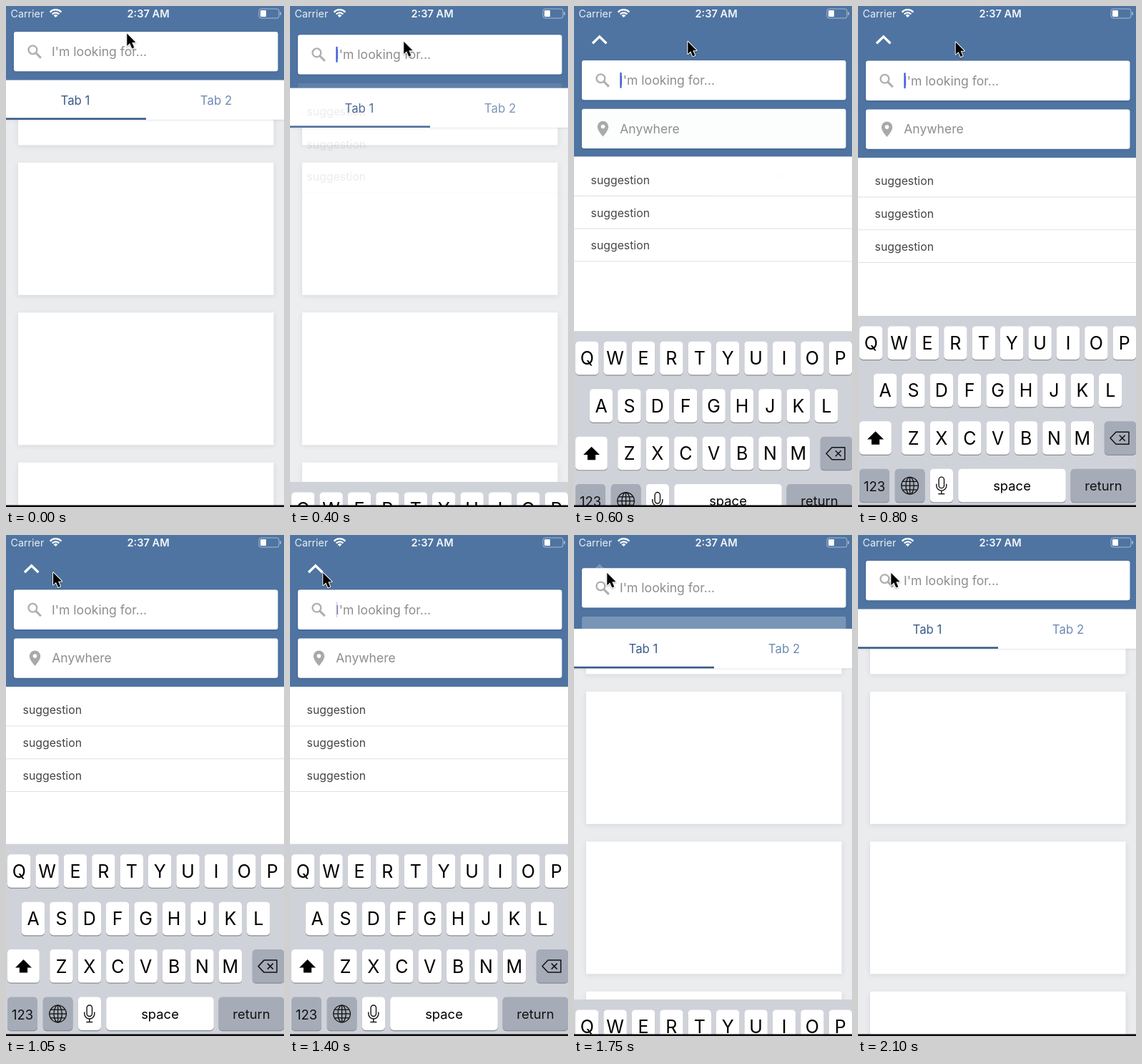
Animation of 389x700 px, one loop 2150 ms. Source, as an HTML page with a canvas:

```html
<!DOCTYPE html>
<html lang="en">
<head>
<meta charset="utf-8">
<title>Expanding search</title>
<style>
html, body { margin: 0; width: 100%; height: 100%; overflow: hidden; background: #ebecee; }
canvas { display: block; width: 389px; height: 700px; }
</style>
</head>
<body>
<canvas id="stage"></canvas>
<script>
const W = 389, H = 700, LOOP = 2150;
const FONT = 'Inter, Roboto, sans-serif';
const BLUE = '#4f74a1';
const canvas = document.getElementById('stage');
const ctx = canvas.getContext('2d');
const dpr = window.devicePixelRatio || 1;
canvas.width = W * dpr;
canvas.height = H * dpr;

const clamp = x => Math.max(0, Math.min(1, x));
const mix = (a, b, k) => a + (b - a) * k;
const ease = x => (1 - Math.cos(Math.PI * clamp(x))) / 2;
const smooth = x => { x = clamp(x); return x * x * (3 - 2 * x); };
// Critically damped spring, ms since its start
const spring = ms => {
  const k = 0.0174 * Math.max(0, ms);
  return 1 - (1 + k) * Math.exp(-k);
};

function rect(x, y, w, h, color) {
  ctx.fillStyle = color;
  ctx.fillRect(x, y, w, h);
}

function box(x, y, w, h, r, color) {
  ctx.fillStyle = color;
  ctx.beginPath();
  ctx.roundRect(x, y, w, h, r);
  ctx.fill();
}

function shadow(color, blur, dy) {
  ctx.shadowColor = color;
  ctx.shadowBlur = blur * dpr;
  ctx.shadowOffsetY = dy * dpr;
}

function poly(points, close) {
  ctx.beginPath();
  points.forEach(([x, y]) => ctx.lineTo(x, y));
  if (close) ctx.closePath();
}

function stroke(color, width) {
  ctx.strokeStyle = color;
  ctx.lineWidth = width;
  ctx.stroke();
}

function text(str, x, y, size, color, align = 'left', weight = 400) {
  ctx.font = `${weight} ${size}px ${FONT}`;
  ctx.fillStyle = color;
  ctx.textAlign = align;
  ctx.textBaseline = 'alphabetic';
  ctx.fillText(str, x, y + size * 0.364);
}

function layer(alpha, draw) {
  if (alpha <= 0) return;
  ctx.save();
  ctx.globalAlpha = alpha;
  draw();
  ctx.restore();
}

function cards() {
  rect(0, 0, W, H, '#ebecee');
  for (let i = 0; i < 4; i++) {
    ctx.save();
    shadow('rgba(60,70,90,0.13)', 7, 2);
    rect(17, 9.3 + i * 209.5, 357.5, 185, '#fff');
    ctx.restore();
  }
}

function statusBar() {
  text('Carrier', 6.5, 10.5, 14.3, '#e9eef5');
  text('2:37 AM', 199, 10.5, 14.6, '#f4f7fa', 'center', 600);
  ctx.lineCap = 'butt';
  for (const r of [6.6, 10.8]) {
    ctx.beginPath();
    ctx.arc(69.5, 16, r, -Math.PI * 0.76, -Math.PI * 0.24);
    stroke('#fff', 2.3);
  }
  ctx.beginPath();
  ctx.moveTo(69.5, 16);
  ctx.arc(69.5, 16, 4, -Math.PI * 0.76, -Math.PI * 0.24);
  ctx.fillStyle = '#fff';
  ctx.fill();
  ctx.beginPath();
  ctx.roundRect(354, 4, 28, 13, 3);
  stroke('rgba(255,255,255,0.5)', 1);
  box(356, 6, 8, 9, 1, '#fff');
  box(383.3, 8.3, 1.7, 4.5, 1, 'rgba(255,255,255,0.5)');
}

function field(y) {
  ctx.save();
  shadow('rgba(20,40,70,0.2)', 3, 1);
  box(11, y, 369.5, 55.3, 3, '#fff');
  ctx.restore();
}

function searchField(y, caret) {
  field(y);
  const cy = y + 27.7;
  ctx.lineCap = 'butt';
  ctx.beginPath();
  ctx.arc(37.4, cy - 2.5, 5.9, 0, Math.PI * 2);
  stroke('#aeaeae', 2.3);
  poly([[41.5, cy + 1.6], [48.8, cy + 8.9]]);
  stroke('#aeaeae', 3);
  text("I'm looking for...", 64, cy, 17.6, '#8d8d8d');
  layer(caret, () => box(64.3, cy - 11, 2.4, 22, 1, '#3f63e0'));
}

function placeField(y) {
  field(y);
  const cy = y + 27.7;
  ctx.fillStyle = '#a9a9a9';
  ctx.beginPath();
  ctx.arc(40.5, cy - 3, 7.7, Math.PI, 0);
  ctx.bezierCurveTo(48.2, cy + 2, 43.5, cy + 7.5, 40.5, cy + 11);
  ctx.bezierCurveTo(37.5, cy + 7.5, 32.8, cy + 2, 32.8, cy - 3);
  ctx.fill();
  ctx.beginPath();
  ctx.arc(40.5, cy - 3, 2.8, 0, Math.PI * 2);
  ctx.fillStyle = '#fff';
  ctx.fill();
  text('Anywhere', 64.3, cy, 17.5, '#8d8d8d');
}

function header(p, bottom, caret) {
  const top = mix(36, 76.6, p);
  rect(0, 0, W, bottom, BLUE);
  statusBar();
  layer(p, () => {
    ctx.lineCap = 'butt';
    ctx.lineJoin = 'miter';
    poly([[26, 52.3], [35.7, 42.9], [45.4, 52.3]]);
    stroke('#fff', 3.4);
  });
  ctx.save();
  ctx.beginPath();
  ctx.rect(0, 0, W, bottom);
  ctx.clip();
  layer(p, () => placeField(top + 67.8));
  ctx.restore();
  searchField(top, caret);
}

function tabs(y) {
  ctx.save();
  shadow('rgba(60,70,90,0.18)', 3, 1);
  rect(0, y, W, 55.3, '#fff');
  ctx.restore();
  text('Tab 1', 97, y + 28, 16.8, '#3b5b8c', 'center');
  text('Tab 2', 294, y + 28, 16.8, '#6f8ab2', 'center');
  rect(0, y + 52.8, 196, 2.6, '#365a8a');
}

function suggestions(y) {
  rect(0, y, W, H - y, '#fff');
  for (let i = 0; i < 3; i++) {
    text('suggestion', 23.6, y + 32.7 + i * 45.7, 15.8, '#444');
    rect(0, y + 54.5 + i * 45.7, W, 1, '#dedfe1');
  }
}

function key(x, y, w, gray) {
  box(x, y + 1.2, w, 46.5, 5, '#898c93');
  box(x, y, w, 46.5, 5, gray ? '#a5acb8' : '#fff');
}

function letters(str, x, y) {
  [...str].forEach((ch, i) => {
    const kx = x + i * 39.4;
    key(kx, y, 32.4);
    text(ch, kx + 16.2, y + 23.5, 25, '#000', 'center');
  });
}

function shiftIcon(x, y) {
  poly([[x, y - 9.5], [x + 11.5, y + 1.8], [x + 5.6, y + 1.8], [x + 5.6, y + 9],
    [x - 5.6, y + 9], [x - 5.6, y + 1.8], [x - 11.5, y + 1.8]], true);
  ctx.fillStyle = '#000';
  ctx.fill();
}

function deleteIcon(x, y) {
  ctx.lineJoin = 'round';
  poly([[x - 13.5, y], [x - 5.5, y - 8.5], [x + 12.5, y - 8.5],
    [x + 12.5, y + 8.5], [x - 5.5, y + 8.5]], true);
  stroke('#111', 1.5);
  for (const s of [-1, 1]) {
    poly([[x - 0.7, y - 4 * s], [x + 7.3, y + 4 * s]]);
    stroke('#111', 1.5);
  }
}

function globeIcon(x, y) {
  for (const rx of [11.8, 5.6]) {
    ctx.beginPath();
    ctx.ellipse(x, y, rx, 11.8, 0, 0, Math.PI * 2);
    stroke('#111', 1.3);
  }
  poly([[x, y - 11.8], [x, y + 11.8]]);
  stroke('#111', 1.3);
  for (const [dy, r] of [[-5.8, 10.2], [0, 11.8], [5.8, 10.2]]) {
    poly([[x - r, y + dy], [x + r, y + dy]]);
    stroke('#111', 1.3);
  }
}

function micIcon(x, y) {
  ctx.beginPath();
  ctx.roundRect(x - 3.7, y - 12, 7.4, 15.5, 3.7);
  stroke('#111', 1.4);
  ctx.beginPath();
  ctx.moveTo(x + 7, y - 2.5);
  ctx.arc(x, y, 7, 0, Math.PI);
  ctx.lineTo(x - 7, y - 2.5);
  stroke('#111', 1.4);
  poly([[x, y + 7], [x, y + 11.5]]);
  stroke('#111', 1.4);
  poly([[x - 4.5, y + 11.5], [x + 4.5, y + 11.5]]);
  stroke('#111', 1.4);
}

function keyboard(top) {
  const row = i => top + 14.6 + i * 66.4;
  rect(0, top, W, H - top + 1, '#cfd2d9');
  letters('QWERTYUIOP', 2, row(0));
  letters('ASDFGHJKL', 21.8, row(1));
  letters('ZXCVBNM', 61.3, row(2));
  key(2, row(2), 44.8);
  shiftIcon(24.5, row(2) + 23.5);
  key(344.8, row(2), 44.4, true);
  deleteIcon(366.5, row(2) + 23.5);

  const y = row(3), cy = y + 23.5;
  key(2, y, 42, true);
  text('123', 23, cy + 1, 18.4, '#111', 'center');
  key(51.8, y, 41.6, true);
  globeIcon(72.6, cy);
  key(100.8, y, 32.2);
  micIcon(116.8, cy);
  key(140.2, y, 150.6);
  text('space', 215.5, cy, 18.4, '#000', 'center');
  key(297.6, y, 91.6, true);
  text('return', 343.5, cy, 18.4, '#111', 'center');
}

function pointer(x, y) {
  ctx.save();
  ctx.translate(x, y);
  shadow('rgba(0,0,0,0.3)', 2, 1);
  ctx.lineJoin = 'round';
  poly([[0, 0], [0, 17.2], [3.9, 13.5], [7, 20.6], [10, 19.3], [7, 12.4], [12.2, 12.2]], true);
  stroke('#fff', 2);
  ctx.shadowColor = 'transparent';
  ctx.fillStyle = '#000';
  ctx.fill();
  ctx.restore();
}

function caretAlpha(t) {
  if (t < 380 || t > 1565) return 0;
  const s = (t - 380) % 1000;
  if (t > 1380) return clamp(s / 100);
  return 1 - clamp((s - 500) / 100);
}

function draw(t) {
  ctx.setTransform(dpr, 0, 0, dpr, 0, 0);
  const closing = t > 1500;
  const p = closing ? 1 - ease((t - 1565) / 280) : ease((t - 343) / 280);
  const q = closing ? 1 - spring(t - 1575) : spring(t - 365);
  const bottom = mix(103.5, 212, p);

  cards();
  tabs(bottom);
  layer(closing ? clamp((p - 0.3) / 0.7) : p, () => suggestions(bottom));
  header(p, bottom, caretAlpha(t));
  if (q > 0.004) keyboard(mix(H, 431.7, q));
  rect(0, 697.4, W, 3, '#0c0c0e');

  const a = smooth(t / 150), b = smooth((t - 640) / 560);
  pointer(mix(mix(169.3, 159.3, a), 46.3, b), mix(mix(38.6, 49.8, a), 53, b));
}

const start = performance.now();
function tick() {
  draw((performance.now() - start) % LOOP);
  requestAnimationFrame(tick);
}
tick();
</script>
</body>
</html>
```
